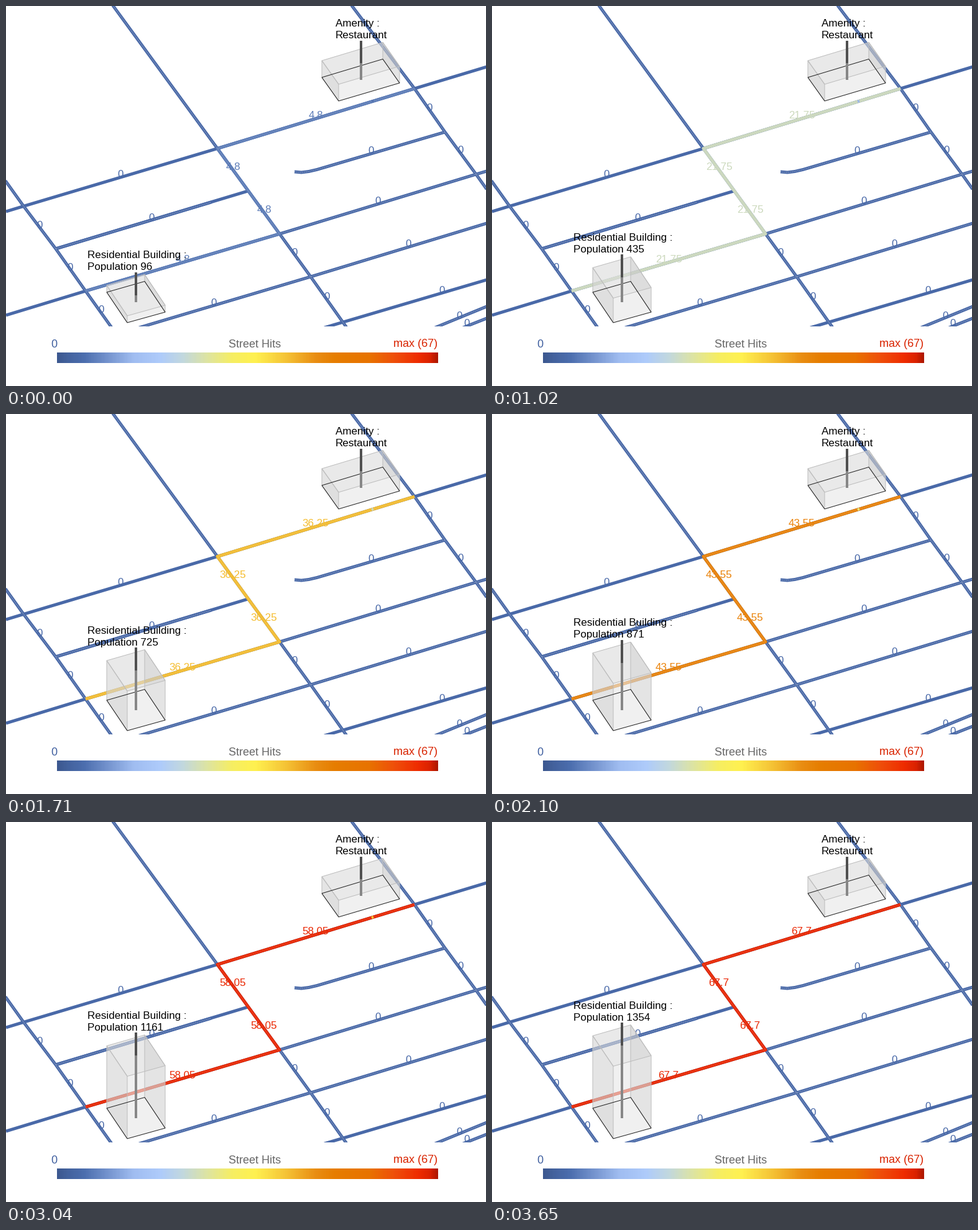
Write a matplotlib script that moves like this. It is 772 px wide and 612 px high and loops after 3.88 s.

```python
import numpy as np
import matplotlib.pyplot as plt
from matplotlib.animation import FuncAnimation
from matplotlib.colors import LinearSegmentedColormap
from matplotlib.patches import Polygon, Rectangle

W, H, DPI = 772, 612, 100
LOOP, STEP = 3880, 20
PX = 72 / DPI
BLUE = "#4969a8"

plt.rcParams["font.family"] = "Liberation Sans"
fig = plt.figure(figsize=(W / DPI, H / DPI), dpi=DPI, facecolor="white")
ax = fig.add_axes([0, 0, 1, 1])
ax.set(xlim=(0, W), ylim=(H, 0))
ax.axis("off")


def ramp(name, stops):
    return LinearSegmentedColormap.from_list(name, stops, N=512)


LEGEND = ramp("legend", [
    (0, "#3c5890"), (.03, "#44639f"), (.07, "#4c6eae"), (.13, "#7392cd"),
    (.20, "#a0bdf1"), (.27, "#aecbfb"), (.33, "#c2d8de"), (.40, "#e0e59c"),
    (.46, "#f6ee62"), (.52, "#fff150"), (.60, "#f5c436"), (.68, "#e98d12"),
    (.73, "#e67d00"), (.82, "#e87300"), (.89, "#ef4d0a"), (.95, "#ee2c00"),
    (.98, "#da2200"), (1, "#ae1800")])
HEAT = ramp("heat", [
    (0, BLUE), (.072, "#5d7db8"), (.144, "#8aa5d9"), (.24, "#afcaf5"),
    (.325, "#ccd9bd"), (.433, "#fcf04b"), (.53, "#f6c433"), (.65, "#ea8208"),
    (.77, "#ea6405"), (.866, "#ea2600"), (1, "#ea2600")])


def heat(hits):
    return HEAT(min(hits / 67, 1.0))


def line(points, color, width, z, **kw):
    x, y = zip(*points)
    return ax.plot(x, y, color=color, lw=width * PX, zorder=z,
                   solid_capstyle="butt", solid_joinstyle="round", **kw)[0]


def label(x, y, text, color="black", size=17, ha="left", z=9):
    return ax.text(x, y, text, color=color, size=size * PX, ha=ha,
                   va="baseline", zorder=z)


def core(points, alpha, z):
    line(points, "#d2d6de", 1, z, alpha=alpha, ls=(0, (2, 1)))


# Streets: (points, whether a pale core shows)
STREETS = [
    ([(0, 331), (28, 322.5), (340, 229.5), (657, 133), (773, 98)], False),
    ([(80, 391), (389, 298)], False),
    ([(80, 391), (330, 316)], True),
    ([(0, 498), (128, 459), (440, 367)], False),
    ([(440, 367), (756, 271), (773, 266)], True),
    ([(214, 518), (490, 436), (773, 350)], True),
    ([(512, 518), (773, 441)], False),
    ([(690, 518), (773, 484)], True),
    ([(735, 518), (773, 503)], True),
    ([(464, 267), (475, 268), (487, 266.5), (500, 263.5), (706, 203)], True),
    ([(171, -2), (340, 229.5), (440, 367), (490, 436), (548, 518)], True),
    ([(-2, 280), (28, 322), (80, 391), (128, 459), (170, 518)], True),
    ([(555, -2), (657, 133), (706, 203), (756, 271), (773, 295)], True),
]
for points, has_core in STREETS:
    line(points, BLUE, 5, 1)
    if has_core:
        core(points, .5, 1.5)

for x, y in [(184, 270), (54, 352), (103, 420), (153, 488), (234, 340),
             (334, 477), (587, 232), (598, 313), (647, 382), (701, 457),
             (729, 498), (741, 510), (464, 396), (516, 467), (681, 163),
             (731, 231)]:
    label(x, y + 6, "0", BLUE, ha="center", z=3)

# Route between the two buildings
ROUTE = [(128, 459), (440, 367), (340, 229.5), (657, 133)]
route = line(ROUTE, BLUE, 5, 2)
core(ROUTE, .3, 2.2)
seam = line([(588, 154), (591, 153)], BLUE, 4, 2.4)
route_labels = [label(x, y + 6, "", ha="center", z=3)
                for x, y in [(498, 175), (365, 258), (415, 327), (284, 407)]]


class Box:
    """Translucent extruded footprint with a pole through its middle."""

    # left, back right, back left, front right
    WALLS = [(0, 3), (1, 2), (0, 1), (3, 2)]
    SHADES = [("#c4c4c4", .42), ("#b4b4b4", .42),
              ("#e2e2e2", .35), ("#ececec", .40)]

    def __init__(self, base):
        self.base = np.array(base, float)
        self.center = self.base.mean(axis=0)
        self.face("#d8d8d8", .30, 5).set_xy(self.base)
        line(base + base[:1], "#202020", 1, 5.5)
        self.walls = [self.face(c, a, 5) for c, a in self.SHADES]
        self.top = self.face("#dadada", .40, 5)
        edge = dict(closed=True, fill=False, ec="#bdbdbd", lw=PX, zorder=5.2)
        self.edges = [ax.add_patch(Polygon(self.base, **edge))
                      for _ in range(3)]
        self.inner = line([(0, 0)], "#878787", 4, 6)
        self.outer = line([(0, 0)], "#505050", 4, 6)

    @staticmethod
    def face(color, alpha, z):
        return ax.add_patch(Polygon([(0, 0)] * 3, closed=True, fc=color,
                                    alpha=alpha, lw=0, zorder=z))

    def set_height(self, height, pole_top):
        roof = self.base - (0, height)
        quads = [[self.base[i], self.base[j], roof[j], roof[i]]
                 for i, j in self.WALLS]
        for wall, quad in zip(self.walls, quads):
            wall.set_xy(quad)
        self.top.set_xy(roof)
        for edge, shape in zip(self.edges, (quads[0], quads[1], roof)):
            edge.set_xy(shape)
        x, y = self.center
        self.inner.set_data([x, x], [y, y - height])
        self.outer.set_data([x, x], [y - height, pole_top])


amenity = Box([(508, 115), (606, 85.5), (633, 124), (535, 153)])
amenity.set_height(27, 56)
label(530, 33.5, "Amenity :")
label(529.7, 52.5, "Restaurant")

home = Box([(162, 461), (223, 443.5), (256, 493), (195, 510)])
home_title = label(131, 0, "Residential Building :")
home_count = label(131, 0, "")

# Legend below the map
ax.add_patch(Rectangle((0, 516), W, H - 516, fc="white", lw=0, zorder=10))
label(77, 550, "0", "#3f5f9f", 18, "center", 11)
label(400.5, 550, "Street Hits", "#666666", 18, "center", 11)
label(658.5, 549, "max (67)", "#d92300", 18, "center", 11)
ax.imshow(np.linspace(0, 1, 613)[None], cmap=LEGEND, aspect="auto",
          extent=(82, 695, 575, 558), zorder=11)
ax.set(xlim=(0, W), ylim=(H, 0))

# Moments at which the population changes
TICKS = np.concatenate(
    [np.linspace(a, b, n) for a, b, n in [
        (320, 780, 7), (850, 1320, 7), (1400, 1860, 7), (1950, 2400, 7),
        (2490, 2950, 7), (3040, 3560, 8), (3650, 3650, 1)]])


def population(ms):
    tick = np.searchsorted(TICKS, ms, side="right")
    units = np.interp(tick, [0, 3, 10, 14, 24, 44], [4, 8, 18, 24, 36, 56])
    return int(round(units) * 24.195)


def update(i):
    people = population(i * STEP + 15)
    hits = people / 20
    color = heat(hits)
    route.set_color(color)
    seam.set_color(heat(hits * .6 if hits < 62 else hits * .9))
    for text in route_labels:
        text.set_text(f"{hits:g}")
        text.set_color(color)
    rise = .084 * people
    home.set_height(3 + rise, 437 - rise)
    home_title.set_y(414.5 - rise)
    home_count.set_y(433.5 - rise)
    home_count.set_text(f"Population {people}")
    return []


anim = FuncAnimation(fig, update, frames=LOOP // STEP, interval=STEP,
                     init_func=lambda: update(0), repeat=True, repeat_delay=0)
plt.show()
```
